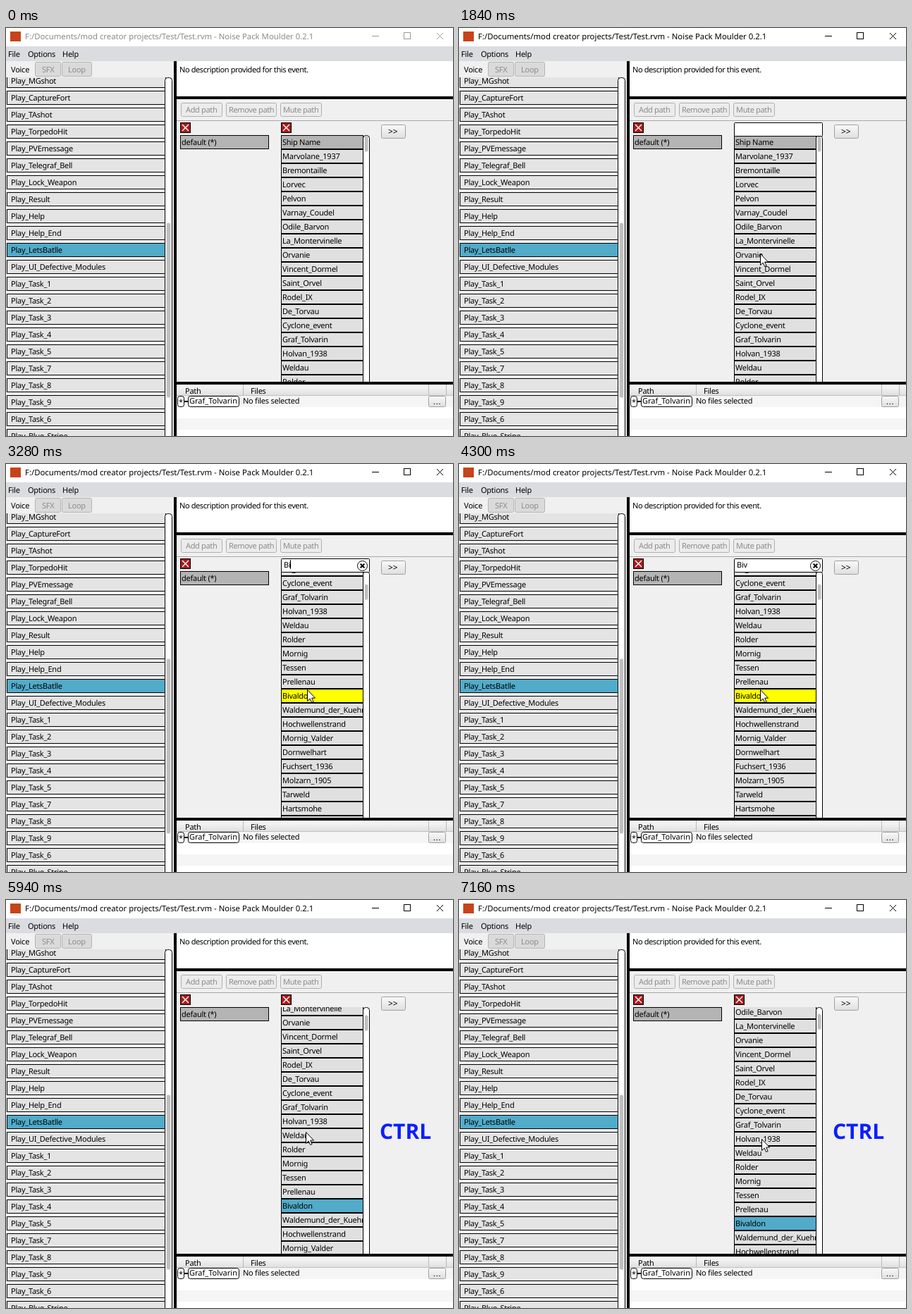
An HTML page with a canvas for the animation above (7.99 s loop, 634x579 px).

```html
<!DOCTYPE html>
<html lang="en">
<head>
<meta charset="utf-8">
<title>Event editor</title>
<style>
  html, body { margin: 0; width: 100%; height: 100%; overflow: hidden; background: #f0f0f0; }
  canvas { display: block; }
</style>
</head>
<body>
<canvas id="stage" width="634" height="579"></canvas>
<script>
const ctx = document.getElementById('stage').getContext('2d');
const LOOP = 7990;
const BLUE = '#52abc9', FACE = '#f0f0f0', HEAD = '#b4b4b4';

const events = ['MGshot', 'CaptureFort', 'TAshot', 'TorpedoHit', 'PVEmessage', 'Telegraf_Bell',
  'Lock_Weapon', 'Result', 'Help', 'Help_End', 'LetsBatlle', 'UI_Defective_Modules', 'Task_1', 'Task_2',
  'Task_3', 'Task_4', 'Task_5', 'Task_7', 'Task_8', 'Task_9', 'Task_6', 'Blue_Stripe'];
const ships = ['Ship Name', 'Marvolane_1937', 'Bremontaille', 'Lorvec', 'Pelvon', 'Varnay_Coudel',
  'Odile_Barvon', 'La_Montervinelle', 'Orvanie', 'Vincent_Dormel', 'Saint_Orvel', 'Rodel_IX', 'De_Torvau',
  'Cyclone_event', 'Graf_Tolvarin', 'Holvan_1938', 'Weldau', 'Rolder', 'Mornig', 'Tessen', 'Prellenau',
  'Bivaldon', 'Waldemund_der_Kuehne', 'Hochwellenstrand', 'Mornig_Valder', 'Dornwelhart',
  'Fuchsert_1936', 'Molzarn_1905', 'Tarweld', 'Hartsmohe', ''];
const FOUND = 21;

// Step tracks: [start ms, value]
const pointer = [[0, null], [200, [480, 490]], [420, [437, 423]], [620, [423, 360]], [820, [426, 320]],
  [1040, [427, 316]], [1240, [427, 320]], [4720, [425, 329]], [6360, [459, 366]], [6560, [463, 367]],
  [6760, [440, 350]], [6960, [429, 341]], [7160, [429, 339]]];
const scroll = [[0, 0], [3280, 253], [5940, 148], [6160, 123]];
const query = [[0, null], [1840, ''], [2660, 'B'], [3280, 'Bi'], [3880, 'Biv'], [5120, null]];
const caret = [[0, false], [2060, true], [4300, false], [4920, true]];
const marks = [[0, {}], [2660, { 2: '#ffff00', 6: '#ff7b00' }], [3280, { [FOUND]: '#ffff00' }],
  [5120, { [FOUND]: BLUE }]];
const at = (track, t) => track.findLast(step => step[0] <= t)[1];

function fill(x, y, w, h, color) {
  ctx.fillStyle = color;
  ctx.fillRect(x, y, w, h);
}
function box(x, y, w, h, color, border = '#000') {
  fill(x, y, w, h, border);
  fill(x + 1, y + 1, w - 2, h - 2, color);
}
function round(x, y, w, h, r, color, border) {
  ctx.beginPath();
  ctx.roundRect(x + .5, y + .5, w - 1, h - 1, r);
  ctx.fillStyle = color;
  ctx.fill();
  if (border) stroke(border, 1);
}
function stroke(color, width) {
  ctx.strokeStyle = color;
  ctx.lineWidth = width;
  ctx.stroke();
}
function shade(y, h, top, bottom) {
  const g = ctx.createLinearGradient(0, y, 0, y + h);
  g.addColorStop(0, top);
  g.addColorStop(1, bottom);
  return g;
}
function text(s, x, y, color = '#000', spacing = -.25, font = '11px') {
  ctx.font = font + ' "Noto Sans", sans-serif';
  ctx.letterSpacing = spacing + 'px';
  ctx.fillStyle = color;
  ctx.fillText(s, x, y);
}
function cross(x, y, r, color, width) {
  ctx.beginPath();
  ctx.moveTo(x - r, y - r); ctx.lineTo(x + r, y + r);
  ctx.moveTo(x + r, y - r); ctx.lineTo(x - r, y + r);
  stroke(color, width);
}
function polygon(points, color) {
  ctx.beginPath();
  points.forEach(([x, y]) => ctx.lineTo(x, y));
  ctx.closePath();
  ctx.fillStyle = color;
  ctx.fill();
}
function clipped(x, y, w, h, draw) {
  ctx.save();
  ctx.beginPath();
  ctx.rect(x, y, w, h);
  ctx.clip();
  draw();
  ctx.restore();
}
function clearButton(x) {
  box(x, 134, 15, 15, '#a81c1c');
  cross(x + 7.5, 141.5, 4.5, '#fff', 1.4);
}

function titleBar(active) {
  const ink = active ? '#000' : '#999';
  fill(0, 0, 634, 26, '#fff');
  fill(6, 5, 15, 14, '#c8431a');
  text('F:/Documents/mod creator projects/Test/Test.rvm - Noise Pack Moulder 0.2.1',
    27, 16, active ? '#000' : '#8a8a8a', 0, '11.35px');
  fill(519, 11, 10, 1, ink);
  box(564, 6, 10, 10, '#fff', ink);
  cross(615.5, 11.5, 4.5, ink, 1);
  fill(0, 26, 634, 21, '#dadce0');
  text('File', 3, 41);
  text('Options', 31, 41);
  text('Help', 80, 41);
}

function eventPanel() {
  round(0, 47, 40, 24, 2, FACE);
  for (const [label, x, w, tx] of [['SFX', 41, 37, 51], ['Loop', 79, 43, 88]]) {
    round(x, 48, w, 21, 2, '#dadada', '#b4b4b4');
    text(label, tx, 63, '#8c8c8c');
  }
  text('Voice', 7, 63);
  clipped(0, 70, 238, 509, () => {
    events.forEach((name, i) => {
      const y = 65 + 24 * i;
      box(1, y, 226, 20, name === 'LetsBatlle' ? BLUE : '#e4e4e4');
      text('Play_' + name, 7, y + 14);
    });
    round(225, 70, 11, 540, 4, '#fff', '#000');
    round(227, 276, 7, 249, 3, '#c0c0c0');
  });
}

function shipList(t) {
  const offset = at(scroll, t), colors = at(marks, t);
  clipped(390, 152, 126, 350, () => {
    ships.forEach((name, i) => {
      const y = 152 + 20 * i - offset;
      box(390, y, 117, 20, colors[i] || (i ? '#e0e0e0' : HEAD));
      text(name, 392, y + 14);
    });
    round(506, 152, 10, 400, 4, '#fff', '#000');
    round(508, 153 + offset * .068, 6, 23, 3, '#c0c0c0');
  });
}

function searchField(t) {
  const s = at(query, t);
  if (s === null) return clearButton(390);
  round(390, 134, 126, 20, 1, '#fff', '#000');
  text(s, 394, 147);
  if (at(caret, t)) fill(Math.round(394 + ctx.measureText(s).width), 136, 1, 13, '#000');
  if (t < 2060) return;
  const ring = x => round(x - 7.5, 137, 15, 15, 7, '#fff', '#000');
  ring(505.5);
  cross(505.5, 144.5, 2.8, '#000', 2);
  if (s !== 'B') return;
  for (const [x, d] of [[469.5, 1], [487.5, -1]]) {
    ring(x);
    polygon([[x, 144.5 - 3 * d], [x + 3.5, 144.5 + 2.5 * d], [x - 3.5, 144.5 + 2.5 * d]], '#000');
  }
}

function editor(t) {
  fill(242, 47, 392, 50, '#fff');
  text('No description provided for this event.', 246, 63, '#000', -.4);
  for (const [label, x, w, tx] of [['Add path', 248, 59, 255], ['Remove path', 312, 72, 316],
    ['Mute path', 389, 59, 393]]) {
    round(x, 106, w, 20, 2, '#ececec', '#b0b0b0');
    text(label, tx, 120, '#8a8a8a', -.35);
  }
  fill(242, 131, 392, 1, '#a8a8a8');
  clearButton(247);
  box(247, 152, 126, 20, HEAD);
  text('default (*)', 249, 166);
  round(532, 137, 35, 20, 2, shade(137, 20, '#fafafa', '#dedede'), '#a0a0a0');
  text('>>', 542, 151, '#000', 0, '12px');
  shipList(t);
  searchField(t);
  if (t >= 5940) text('CTRL', 530, 339, '#0a1eff', 0, 'bold 30px');
}

function pathTable() {
  fill(242, 506, 392, 73, '#fff');
  fill(242, 506, 392, 16, shade(506, 16, '#fafafa', '#dedede'));
  for (const x of [336, 599, 624]) fill(x, 506, 1, 16, '#b8b8b8');
  fill(242, 521, 392, 1, '#c0c0c0');
  fill(242, 522, 392, 16, '#f5f5f5');
  fill(242, 554, 392, 16, '#f5f5f5');
  text('Path', 254, 519);
  text('Files', 347, 519);
  fill(252, 529, 8, 2, '#000');
  round(243, 522, 10, 16, 3, '#fff', '#000');
  round(258, 522, 73, 16, 3, '#fff', '#000');
  text('*', 245, 535);
  text('Graf_Tolvarin', 260, 533, '#000', 0);
  text('No files selected', 336, 533);
  round(599, 522, 25, 16, 2, shade(522, 16, '#fafafa', '#dedede'), '#a0a0a0');
  text('...', 606, 534, '#000', .8);
}

function drawPointer(position) {
  if (!position) return;
  ctx.save();
  ctx.translate(position[0] + .5, position[1] + .5);
  polygon([[0, 0], [0, 16], [3.7, 12.6], [6.2, 18], [8.6, 17], [6.2, 11.6], [11, 11.6]], '#fff');
  stroke('#000', 1);
  ctx.restore();
}

function render(t) {
  fill(0, 0, 634, 579, FACE);
  titleBar(t >= 1640);
  eventPanel();
  editor(t);
  pathTable();
  fill(238, 47, 4, 532, '#000');
  fill(238, 97, 396, 4, '#000');
  fill(238, 502, 396, 4, '#000');
  drawPointer(at(pointer, t));
}

ctx.textRendering = 'geometricPrecision';
const start = performance.now();
function frame() {
  render((performance.now() - start) % LOOP);
  requestAnimationFrame(frame);
}
frame();
</script>
</body>
</html>
```
